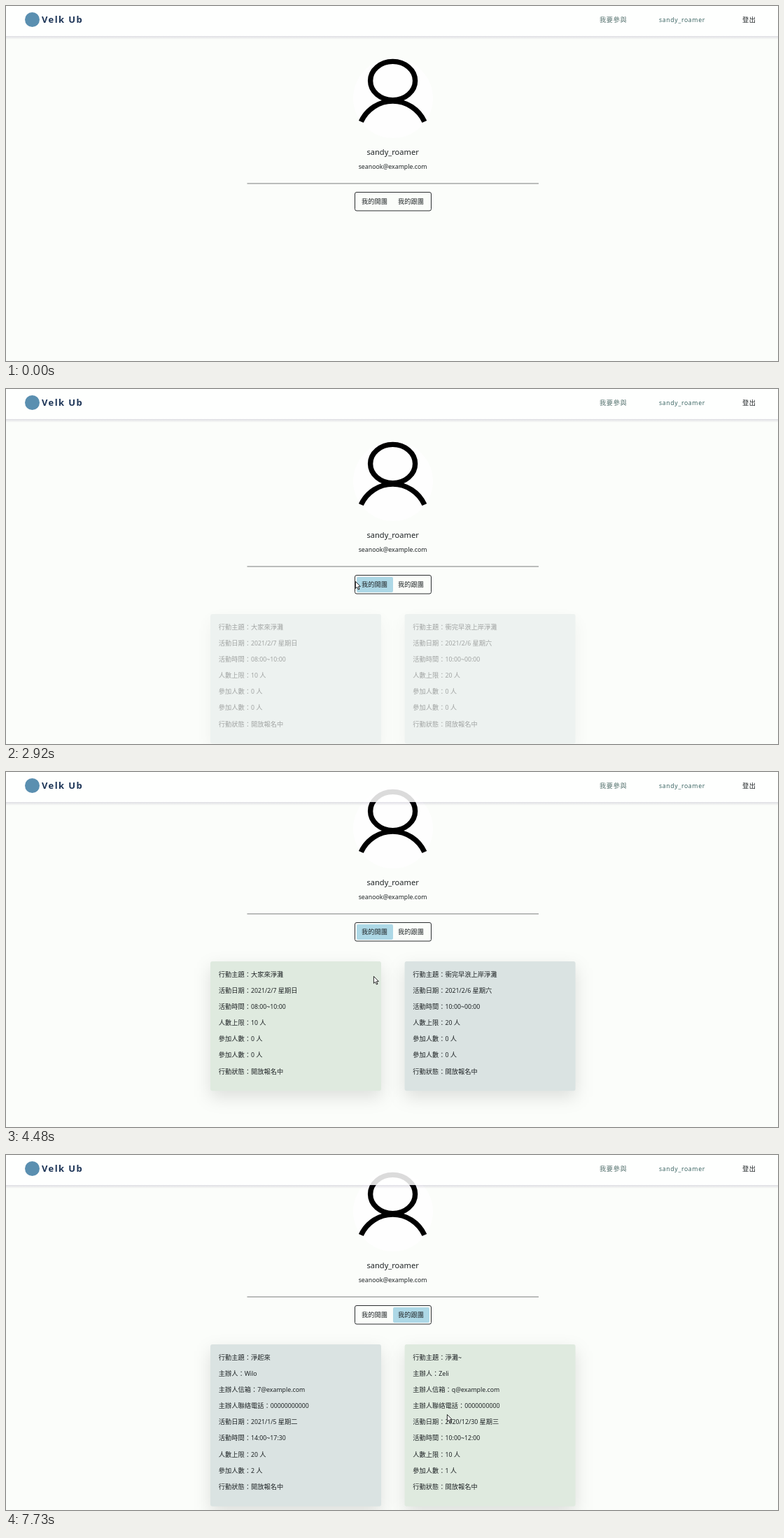
An HTML page that plays this animation: 1103 px wide and 508 px high, repeating every 8000 ms.

```html
<!DOCTYPE html>
<html lang="zh-Hant">
<head>
<meta charset="utf-8">
<title>Profile page</title>
<style>
  html, body { margin: 0; width: 100%; height: 100%; overflow: hidden; background: #fbfdfa; }
  svg { display: block; width: 100vw; height: 100vh; }
  text { font-family: "Noto Sans CJK TC", "Noto Sans", sans-serif; white-space: pre; }
  tspan { font-family: "Noto Sans", "Open Sans", sans-serif; font-weight: 500; }
</style>
</head>
<body>
<svg id="stage" viewBox="0 0 1103 508">
  <defs>
    <filter id="blur" x="-30%" y="-30%" width="160%" height="160%">
      <feGaussianBlur stdDeviation="12"/>
    </filter>
    <linearGradient id="edge" x2="0" y2="1">
      <stop offset="0" stop-color="#3a3060" stop-opacity=".15"/>
      <stop offset="1" stop-color="#3a3060" stop-opacity="0"/>
    </linearGradient>
  </defs>
  <rect width="1103" height="508" fill="#fbfdfa"/>
  <g id="page">
    <circle cx="553" cy="132" r="57" fill="#fefefe"/>
    <g fill="none" stroke="#000" stroke-width="7.4">
      <ellipse cx="552.6" cy="107" rx="32" ry="27.6"/>
      <path d="M507.3 165.5A50 51 0 0 1 597.9 165.5"/>
    </g>
    <path d="M344.5 254H761" stroke="#7b7d7c"/>
    <rect x="501" y="269" width="52" height="22" rx="2" fill="#add8e6" id="tab0"/>
    <rect x="553" y="269" width="52" height="22" rx="2" fill="#add8e6" id="tab1"/>
    <rect x="498.5" y="266.5" width="109" height="26.5" rx="2.5" fill="none" stroke="#2c2f31"/>
  </g>
  <g id="header">
    <rect y="43" width="1103" height="5" fill="url(#edge)"/>
    <rect width="1103" height="43" fill="#fff" fill-opacity=".86"/>
    <circle cx="37.5" cy="19.5" r="10.5" fill="#5a8fb0"/>
  </g>
  <g id="cursor" fill="#fff" stroke="#111" stroke-width=".9" stroke-linejoin="round">
    <path id="arrow" d="M.4.4V10.4L2.7 8.3 4.4 12 6 11.3 4.4 7.7H7.4Z"/>
    <path id="hand" d="M-1.1 8.6V1.2A1.1 1.1 0 0 1 1.1 1.2V5.4Q2.2 4.6 2.9 5.7 4 5 4.5 6.1 5.9 5.8 5.9 7.4V10.3Q5.8 12.3 4.7 13V14.6H-.6V13.2Q-2.2 11.4-3.5 8.9-3.9 7.6-2.7 7.5-2 7.6-1.1 8.6Z"/>
  </g>
</svg>
<script>
const NS = 'http://www.w3.org/2000/svg';
const LOOP = 8000;
const EM = 9.25;
const ROW = 23.17;
const GREY = [218, 227, 226], GREEN = [223, 234, 223];
const $ = id => document.getElementById(id);

function add(parent, tag, attrs) {
  const el = document.createElementNS(NS, tag);
  for (const k in attrs) el.setAttribute(k, attrs[k]);
  return parent.appendChild(el);
}

// Latin runs are set slightly smaller than the CJK glyphs beside them.
function label(parent, x, mid, str, { size = EM, fill = '#1f2426', ...more } = {}) {
  const el = add(parent, 'text', { x, y: mid + size * 0.37, 'font-size': size, fill, ...more });
  for (const run of str.match(/[ -~]+|[^ -~]+/g)) {
    if (/[ -~]/.test(run)) add(el, 'tspan', { 'font-size': size * 0.95 }).textContent = run;
    else el.append(run);
  }
  return el;
}

function card(parent, x, rows) {
  const box = { x, y: 322, width: 244, height: 23.1 + rows.length * ROW, rx: 3 };
  add(parent, 'rect', { ...box, y: 331, fill: '#000', 'fill-opacity': 0.12, filter: 'url(#blur)' });
  const face = add(parent, 'rect', box);
  rows.forEach((row, i) => label(parent, x + 11.7, 340.2 + i * ROW, row));
  return { face, x0: x, x1: x + 244, y0: 322, y1: 322 + box.height };
}

function cardSet(...lists) {
  const g = add($('page'), 'g', {});
  return { g, cards: lists.map((rows, i) => card(g, 292 + i * 277.6, rows)) };
}

const middle = { 'text-anchor': 'middle' };
label($('page'), 552.6, 208.5, 'sandy_roamer', { size: 11.7, ...middle });
label($('page'), 552.6, 229.3, 'seanook@example.com', middle);
label($('page'), 508, 280, '我的開團');
label($('page'), 560, 280, '我的跟團');

const spaced = { 'letter-spacing': 0.6 };
const brand = add($('header'), 'text', {
  x: 51, y: 24.3, 'font-size': 13, 'letter-spacing': 1.4, fill: '#1d3557',
  style: 'font-family:"Noto Sans",sans-serif;font-weight:800'
});
brand.textContent = 'Velk Ub';
label($('header'), 848, 19.7, '我要參與', { fill: '#56726f', ...spaced });
label($('header'), 933, 19.7, 'sandy_roamer', { fill: '#3f6866', ...spaced });
label($('header'), 1052, 19.7, '登出', spaced);

const event = (topic, date, time, max) => [
  '行動主題：' + topic, '活動日期：' + date, '活動時間：' + time, `人數上限：${max} 人`,
  '參加人數：0 人', '參加人數：0 人', '行動狀態：開放報名中'
];
const joined = (topic, host, mail, phone, date, time, max, count) => [
  '行動主題：' + topic, '主辦人：' + host, '主辦人信箱：' + mail, '主辦人聯絡電話：' + phone,
  '活動日期：' + date, '活動時間：' + time, `人數上限：${max} 人`, `參加人數：${count} 人`,
  '行動狀態：開放報名中'
];
const hosted = cardSet(
  event('大家來淨灘', '2021/2/7 星期日', '08:00~10:00', 10),
  event('衝完早浪上岸淨灘', '2021/2/6 星期六', '10:00~00:00', 20));
const followed = cardSet(
  joined('淨起來', 'Wilo', '7@example.com', '00000000000', '2021/1/5 星期二', '14:00~17:30', 20, 2),
  joined('淨灘~', 'Zeli', 'q@example.com', '0000000000', '2020/12/30 星期三', '10:00~12:00', 10, 1));

const OPEN = 2520, SWITCH = 6640;
const PATH = [
  [70, 992, 472], [760, 758, 414], [920, 758, 414], [1600, 500, 254], [1750, 514, 266],
  [2010, 520, 275], [2780, 520, 275], [3300, 441, 274], [3860, 441, 274], [4480, 524.5, 292],
  [4720, 616, 323], [4800, 617, 323], [5110, 617, 323], [5570, 510, 337], [5970, 510, 337],
  [6040, 520, 321], [6500, 581, 230], [6890, 581, 230], [7420, 596, 273], [7440, 596, 273],
  [7730, 630, 371]
];

const clamp = v => Math.min(1, Math.max(0, v));
function fade(t, start, span) {
  const p = clamp((t - start) / span);
  return p * p * p * (p * (6 * p - 15) + 10);
}

function pointer(t) {
  let i = 1;
  while (i < PATH.length - 1 && t > PATH[i][0]) i++;
  const [t0, x0, y0] = PATH[i - 1], [t1, x1, y1] = PATH[i];
  const p = clamp((t - t0) / (t1 - t0));
  return [x0 + (x1 - x0) * p, y0 + (y1 - y0) * p];
}

const scrollAt = t => t < 3480 ? 0 : t < 3550 ? 19 : t < 3610 ? 41 : 51;

function inside(t, { x0, x1, y0, y1 }) {
  const [x, y] = pointer(t), py = y + scrollAt(t);
  return x >= x0 && x <= x1 && py >= y0 && py <= y1;
}

// Share of the last 200 ms spent over the card: a linear hover transition.
function hover(t, c) {
  let n = 0;
  for (let k = 0; k < 20; k++) n += inside(t - k * 10, c);
  return n / 20;
}

function showSet(set, t, alpha) {
  set.g.setAttribute('opacity', alpha);
  for (const c of set.cards) {
    const h = hover(t, c);
    const rgb = GREY.map((v, i) => Math.round(v + (GREEN[i] - v) * h));
    c.face.setAttribute('fill', `rgb(${rgb})`);
  }
}

const tabs = { x0: 499, x1: 607, y0: 266, y1: 293 };

function draw(t) {
  $('page').setAttribute('transform', `translate(0 ${-scrollAt(t)})`);
  const second = fade(t, SWITCH, 350);
  $('tab0').setAttribute('opacity', fade(t, OPEN, 350) - second);
  $('tab1').setAttribute('opacity', second);
  showSet(hosted, t, t < SWITCH ? fade(t, OPEN, 900) : 0);
  showSet(followed, t, fade(t, SWITCH, 900));

  const [x, y] = pointer(t), over = inside(t, tabs);
  $('cursor').setAttribute('transform', `translate(${Math.round(x)} ${Math.round(y)})`);
  $('cursor').setAttribute('visibility', t < 70 ? 'hidden' : 'visible');
  $('arrow').setAttribute('opacity', over ? 0 : 1);
  $('hand').setAttribute('opacity', over ? 1 : 0);
}

const begin = performance.now();
function tick() {
  draw((performance.now() - begin) % LOOP);
  requestAnimationFrame(tick);
}
tick();
</script>
</body>
</html>
```
